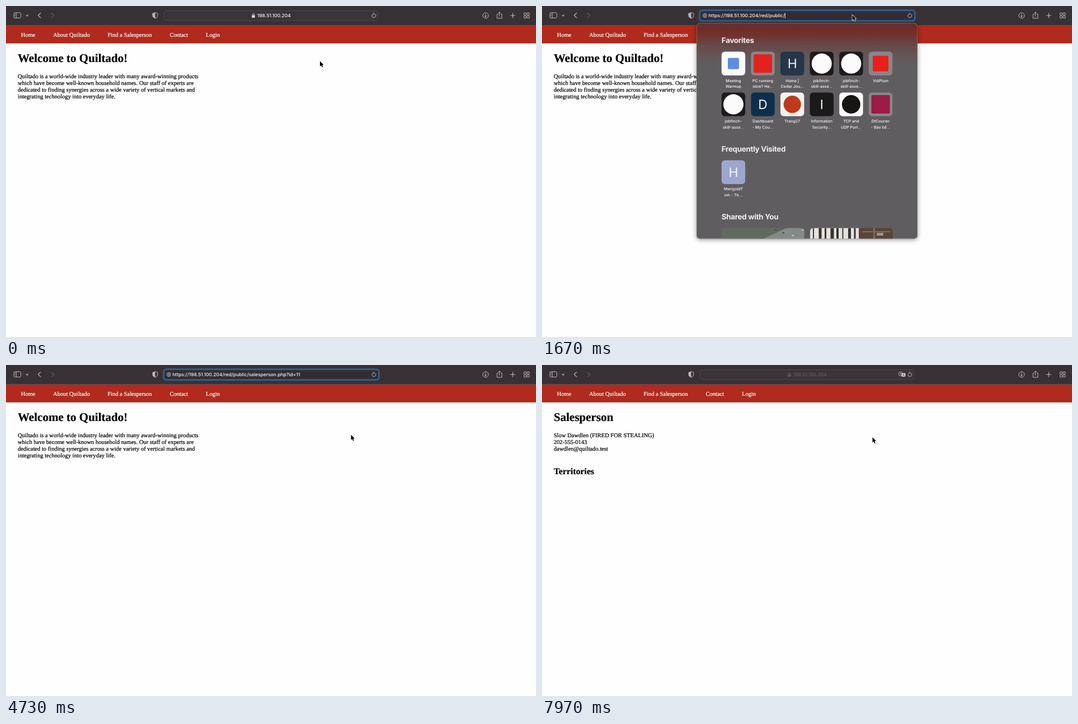
These frames come from a looping animation (947x591 px, 8 s). An HTML page with a canvas:

```html
<!DOCTYPE html>
<html lang="en">
<head>
<meta charset="utf-8">
<title>Browser session</title>
<style>
  html, body { margin: 0; width: 100%; height: 100%; overflow: hidden; background: #fefefe; }
  canvas { display: block; }
</style>
</head>
<body>
<canvas id="stage" width="947" height="591"></canvas>
<script>
const W = 947, H = 591, LOOP = 8000;
const SERIF = '"Liberation Serif", "Times New Roman", serif';
const SANS = 'Inter, Roboto, sans-serif';
const HOST = '198.51.100.204';
const BASE_URL = `https://${HOST}/red/public/`;
const FULL_URL = BASE_URL + 'salesperson.php?id=11';
const ICON = '#bdb8bc', FAINT = '#625c61';

const stage = document.getElementById('stage').getContext('2d');
const layer = document.createElement('canvas');
layer.width = W;
layer.height = H;
let ctx = stage;

const progress = (t, a, b) => Math.min(1, Math.max(0, (t - a) / (b - a)));
const easeOut = (p, power) => 1 - (1 - p) ** power;
const smooth = p => p * p * (3 - 2 * p);
const within = (t, a, b) => t >= a && t < b;

function text(str, x, y, font, color, align = 'left') {
  ctx.font = font;
  ctx.fillStyle = color;
  ctx.textAlign = align;
  ctx.fillText(str, x, y);
}

// A hairline outline gives the serif text its heavier screen weight.
function pageText(str, x, y, font, color) {
  text(str, x, y, font, color);
  ctx.strokeStyle = color;
  ctx.lineWidth = .22;
  ctx.strokeText(str, x, y);
}

function box(x, y, w, h, r, fill, stroke, width = 1) {
  ctx.beginPath();
  ctx.roundRect(x, y, w, h, r);
  if (fill) { ctx.fillStyle = fill; ctx.fill(); }
  if (stroke) { ctx.strokeStyle = stroke; ctx.lineWidth = width; ctx.stroke(); }
}

function disc(x, y, r, fill) {
  ctx.beginPath();
  ctx.arc(x, y, r, 0, 7);
  ctx.fillStyle = fill;
  ctx.fill();
}

function stroke(path, color = ICON, width = 1) {
  ctx.strokeStyle = color;
  ctx.lineWidth = width;
  ctx.stroke(new Path2D(path));
}

function faded(alpha, draw) {
  ctx.save();
  ctx.globalAlpha *= alpha;
  draw();
  ctx.restore();
}

// ---- page ----
function drawPage(t) {
  ctx.fillStyle = '#fefefe';
  ctx.fillRect(0, 0, W, H);
  ctx.fillStyle = '#b02a1d';
  ctx.fillRect(0, 34.8, W, 32);
  const body = `10.52px ${SERIF}`, h1 = `bold 21.04px ${SERIF}`;
  [['Home', 26.8], ['About Quiltado', 84.2], ['Find a Salesperson', 181.4], ['Contact', 292.5], ['Login', 357]]
    .forEach(([label, x]) => pageText(label, x, 54.6, body, '#fff'));

  const loaded = t >= 5450;
  const lines = loaded
    ? ['Slow Dawdlen (FIRED FOR STEALING)', '202-555-0143', 'dawdlen@quiltado.test']
    : ['Quiltado is a world-wide industry leader with many award-winning products',
       'which have become well-known household names. Our staff of experts are',
       'dedicated to finding synergies across a wide variety of vertical markets and',
       'integrating technology into everyday life.'];
  pageText(loaded ? 'Salesperson' : 'Welcome to Quiltado!', 21, 100.3, h1, '#000');
  lines.forEach((line, i) => pageText(line, 21, 129 + i * 11.84, body, '#000'));
  if (loaded) pageText('Territories', 21, 194.7, `bold 15.78px ${SERIF}`, '#000');
}

// ---- toolbar ----
function drawToolbar(t) {
  ctx.fillStyle = '#373136';
  ctx.fillRect(0, 0, W, 34.8);
  const loading = within(t, 4960, 5800);

  box(14, 12, 12.5, 9.5, 2, null, ICON);
  stroke('M18.5 12V21.5M15.5 14.3h1.6M15.5 16.2h1.6M15.5 18.1h1.6', ICON, .9);
  stroke('M31.5 11V22', '#484247');
  stroke('M35.8 15.8L37.8 18L39.8 15.8', ICON, 1.2);
  stroke('M62 12.3L57.5 16.8L62 21.3', ICON, 1.2);
  stroke('M81 12.3L85.5 16.8L81 21.3', FAINT, 1.2);

  stroke('M266.5 11.8L271 13.3V17Q271 20.5 266.5 22.2Q262 20.5 262 17V13.3Z');
  ctx.fillStyle = ICON;
  ctx.fill(new Path2D('M266.5 11.8V22.2Q262 20.5 262 17V13.3Z'));

  ctx.beginPath();
  ctx.arc(857, 17, 5, 0, 7);
  ctx.strokeStyle = ICON;
  ctx.lineWidth = 1;
  ctx.stroke();
  stroke('M857 14V19.6M854.8 17.5L857 19.7L859.2 17.5');
  stroke('M879.5 14.5H877.3V22H886V14.5H883.8M881.6 18.5V10.8M879.3 13L881.6 10.7L883.9 13', loading ? FAINT : ICON);
  stroke('M905.5 12.5V21.5M901 17H910', ICON, 1.1);
  for (const x of [925.5, 931])
    for (const y of [12.2, 17.7]) box(x, y, 4, 4, .8, null, ICON);

  drawAddress(t, loading);
}

function drawLock(x) {
  box(x, 16.3, 5.4, 4.7, .8, '#dedbdd');
  stroke(`M${x + 1.1} 16.5V15.2A1.6 1.7 0 0 1 ${x + 4.3} 15.2V16.5`, '#dedbdd', .9);
}

function drawGlobe(x, y) {
  ctx.strokeStyle = '#a49fa3';
  ctx.lineWidth = .7;
  for (const rx of [3.8, 1.8]) {
    ctx.beginPath();
    ctx.ellipse(x, y, rx, 3.8, 0, 0, 7);
    ctx.stroke();
  }
  stroke(`M${x} ${y - 3.8}v7.6M${x - 3.8} ${y}h7.6M${x - 3.2} ${y - 2}h6.4M${x - 3.2} ${y + 2}h6.4`, '#a49fa3', .6);
}

function drawAddress(t, loading) {
  const font = `500 8.45px ${SANS}`;
  const ring = progress(t, 770, 850) * (1 - progress(t, 4930, 5060));
  const slide = easeOut(progress(t, 800, 1100), 3) - easeOut(progress(t, 4930, 5230), 3);
  const focused = within(t, 800, 4930);
  box(282.5, 8.5, 382.5, 17.5, 4.5, '#39333a', '#4d474c');
  if (ring > 0) faded(ring, () => box(281.6, 7.6, 384.8, 19, 5, '#332d33', '#2d6097', 2.8));

  const x = 449 - 151.5 * slide;
  if (focused) {
    const url = t < 2500 ? BASE_URL : FULL_URL;
    ctx.font = font;
    const width = ctx.measureText(url).width;
    if (t < 1500) {
      ctx.fillStyle = '#44688f';
      ctx.fillRect(x - .5, 12, width + 1, 10.5);
    }
    faded(Math.max(0, slide), () => drawGlobe(291, 17));
    text(url, x, 20.3, font, '#f8f6f7');
    if (within(t, 1500, 2060) || within(t, 2500, 3100) || within(t, 3650, 4200)) {
      ctx.fillStyle = '#f4f2f3';
      ctx.fillRect(x + width, 12.2, .9, 10);
    }
  } else {
    faded(1 - progress(t, 7870, 8000), () => {
      drawLock(x - 9.7);
      text(HOST, x, 20.3, font, '#f8f6f7');
    });
  }

  if (loading) {
    stroke('M654.6 14.1L660.4 19.9M660.4 14.1L654.6 19.9', ICON, 1.1);
  } else {
    ctx.beginPath();
    ctx.arc(657.3, 17.3, 3.4, -.9, 4.6);
    ctx.strokeStyle = ICON;
    ctx.lineWidth = 1;
    ctx.stroke();
    stroke('M656.3 12L658.5 13.9L656.4 15.6', ICON, .9);
  }

  if (within(t, 5000, 5825)) {
    const part = .51 * progress(t, 5000, 5670) + .49 * progress(t, 5680, 5790);
    ctx.fillStyle = '#3f7fd0';
    ctx.fillRect(283.5, 24.8, 381 * part, 1.5);
  }

  faded(progress(t, 7700, 7850), () => {
    box(637.4, 12.7, 6.4, 6.2, 1.3, '#373136', ICON, .9);
    stroke('M639 14.8h3.2M640.6 14v.8M639.2 17.4L641.8 15M639.4 15.2L641.8 17.4', ICON, .6);
    box(642.4, 14.6, 7, 6.2, 1.3, '#dedbdd');
    stroke('M644.3 19.4L645.9 15.8L647.5 19.4M645 18.2h1.8', '#373136', .7);
  });
}

// ---- start page popover, rendered once to its own layer ----
const TILES = [
  { bg: '#fbfbfb', square: '#5b8fe0', size: 20, label: ['Meeting', 'Warmup'] },
  { bg: '#8b8587', square: '#e2231d', size: 33, label: ['PC running', 'slow? He...'] },
  { bg: '#25364a', letter: 'H', label: ['Home |', 'Cedar Jou...'] },
  { bg: '#1c1a1c', disc: '#fbfbfb', size: 36, label: ['jobfinch-', 'skill-asse...'] },
  { bg: '#1c1a1c', disc: '#fbfbfb', size: 36, label: ['jobfinch-', 'skill-asse...'] },
  { bg: '#8b8587', square: '#e8201c', size: 28, label: ['VidPlum'] },
  { bg: '#1c1a1c', disc: '#fbfbfb', size: 36, label: ['jobfinch-', 'skill-asse...'] },
  { bg: '#0d2f4c', letter: 'D', label: ['Dashboard', '- My Cou...'] },
  { bg: '#f3f1f0', disc: '#c0391b', size: 31, label: ['Trang27'] },
  { bg: '#1b1a1b', letter: 'I', label: ['Information', 'Security...'] },
  { bg: '#fbfbfb', disc: '#171514', size: 33, label: ['TCP and', 'UDP Port...'] },
  { bg: '#8b8587', square: '#9b1c46', size: 33, label: ['DtCourier', '- Báo tiế...'] },
];

function drawTile(tile, x, y) {
  const { bg, square, disc: round, letter, size, label } = tile;
  box(x - 21.2, y - 21.2, 42.4, 42.4, 6, bg);
  if (square) box(x - size / 2, y - size / 2, size, size, 2, square);
  if (round) disc(x, y, size / 2, round);
  if (letter) text(letter, x, y + 8.6, `23px ${SANS}`, '#f5f5f5', 'center');
  label.forEach((line, i) => text(line, x, y + 32.7 + i * 10.5, `500 7px ${SANS}`, '#fbf9fa', 'center'));
}

function photo(x, paint) {
  ctx.save();
  ctx.beginPath();
  ctx.roundRect(x, 396.5, 148, 40, 6);
  ctx.clip();
  paint();
  ctx.restore();
}

function drawParkingPhoto() {
  ctx.fillStyle = '#62695f';
  ctx.fillRect(320, 396, 149, 20);
  ctx.fillStyle = '#858987';
  ctx.fill(new Path2D('M395 416L438 396H469V416Z'));
  for (let i = 0; i < 12; i++) box(415 + (i * 17) % 52, 399 + (i * 5) % 15, 5, 2, 1, i % 2 ? '#c3c7ca' : '#4b5154');
}

function drawShelfPhoto() {
  ctx.fillStyle = '#e4e2df';
  ctx.fillRect(479, 396, 90, 20);
  ctx.fillStyle = '#57453a';
  ctx.fillRect(566, 396, 62, 20);
  ctx.fillStyle = '#383333';
  for (let i = 0; i < 8; i++) ctx.fillRect(484 + i * 10.5, 396, 2 + (i * 3) % 5, 20);
  ctx.fillStyle = '#8a6a4f';
  ctx.fillRect(572, 402, 50, 2);
  ctx.fillRect(592, 396, 3, 20);
  ctx.fillStyle = '#9a9690';
  ctx.fillRect(598, 405, 12, 5);
}

function renderPopover() {
  ctx = layer.getContext('2d');
  ctx.textRendering = 'geometricPrecision';
  const fill = ctx.createLinearGradient(0, 30, 0, 108);
  [[0, '#5e3533'], [.12, '#702a25'], [.3, '#703430'], [.55, '#674b4b'], [.8, '#62585a'], [1, '#605d60']]
    .forEach(([at, color]) => fill.addColorStop(at, color));

  ctx.save();
  ctx.shadowColor = 'rgba(0,0,0,.4)';
  ctx.shadowBlur = 9;
  ctx.shadowOffsetY = 2;
  box(276, 30, 395, 385.5, 6, '#605d60');
  ctx.restore();
  box(276, 30, 395, 385.5, 6, fill);
  ctx.save();
  ctx.clip();
  photo(320.5, drawParkingPhoto);
  photo(479, drawShelfPhoto);
  ctx.restore();
  box(276.5, 30.5, 394, 384.5, 6, null, 'rgba(255,255,255,.2)');

  ctx.letterSpacing = '-0.3px';
  [['Favorites', 66.2], ['Frequently Visited', 260.2], ['Shared with You', 381.2]]
    .forEach(([title, y]) => text(title, 320.8, y, `bold 13.4px ${SANS}`, '#f1eeef'));
  ctx.letterSpacing = '0px';
  TILES.forEach((tile, i) => drawTile(tile, 342 + (i % 6) * 52.6, i < 6 ? 102.8 : 175.6));
  drawTile({ bg: '#9ba7cc', letter: 'H', label: ['MarigoldT', 'inh - Th...'] }, 342, 296.7);
  ctx.clearRect(0, 0, W, 28);
  ctx = stage;
}

function drawPopover(t) {
  const alpha = easeOut(progress(t, 870, 1140), 2) * (1 - progress(t, 2530, 2730));
  if (alpha <= 0) return;
  faded(alpha, () => {
    const scale = 1 - .023 * (1 - alpha);
    ctx.translate(473.5, 30);
    ctx.scale(scale, scale);
    ctx.drawImage(layer, -473.5, -30);
  });
}

// ---- pointer ----
const ROUTE = [
  [30, 561, 98.5], [650, 554.5, 16], [3630, 554.5, 16],
  [4400, 616.5, 124.5], [7700, 616.5, 124.5], [7970, 590.5, 129],
];

function pointerAt(t) {
  let [, x, y] = ROUTE[0];
  for (let i = 1; i < ROUTE.length; i++) {
    const [from, ax, ay] = ROUTE[i - 1], [to, bx, by] = ROUTE[i];
    if (t < from) break;
    const p = smooth(progress(t, from, to));
    x = ax + (bx - ax) * p;
    y = ay + (by - ay) * p;
  }
  return [x, y];
}

function drawPointer(t) {
  if (within(t, 4930, 6530)) return;
  const [x, y] = pointerAt(t);
  ctx.save();
  ctx.translate(x, y);
  if (y < 27 && !within(t, 1450, 2600)) {
    const beam = 'M-2.4 -5Q0 -5 0 -3.5V3.5Q0 5 -2.4 5M2.4 -5Q0 -5 0 -3.5M0 3.5Q0 5 2.4 5M-1.3 1.4H1.3';
    stroke(beam, '#e6e4e5', 2);
    stroke(beam, '#1c191b', .7);
  } else {
    const arrow = new Path2D('M0 0V9.4L2.1 7.4L3.6 10.9L5.2 10.2L3.7 6.8H6.6Z');
    ctx.strokeStyle = '#fff';
    ctx.lineWidth = 1.5;
    ctx.lineJoin = 'round';
    ctx.stroke(arrow);
    ctx.fillStyle = '#000';
    ctx.fill(arrow);
  }
  ctx.restore();
}

function frame(now) {
  const t = now % LOOP;
  drawPage(t);
  drawToolbar(t);
  drawPopover(t);
  drawPointer(t);
  requestAnimationFrame(frame);
}

stage.textRendering = 'geometricPrecision';
renderPopover();
requestAnimationFrame(frame);
</script>
</body>
</html>
```
